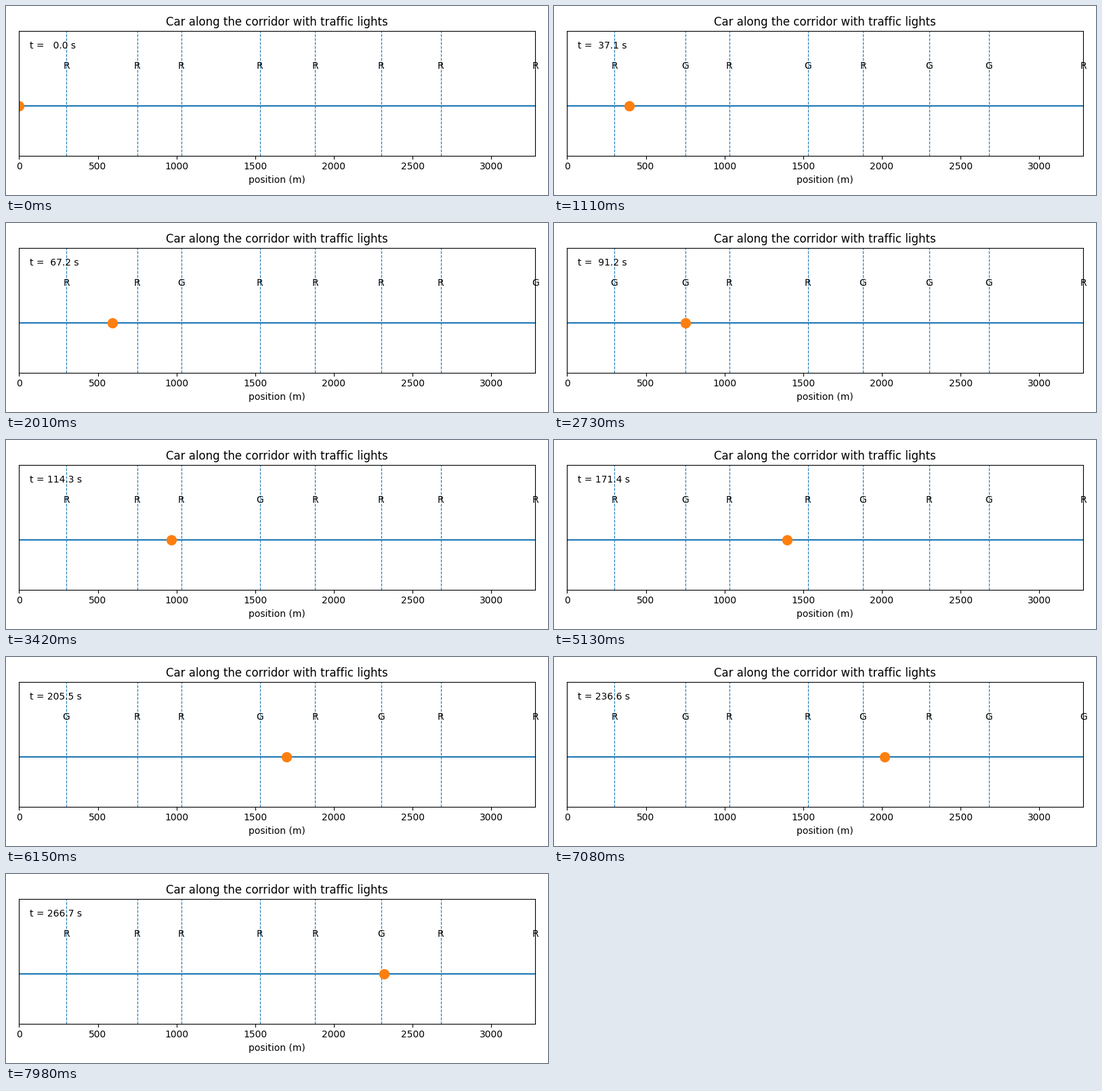
Recreate the animation shown at these times as a matplotlib script. Size 800 by 280 pixels, loop 8000 ms.

```python
import numpy as np
import matplotlib.pyplot as plt
from matplotlib.animation import FuncAnimation

LOOP_MS = 8000
FRAMES = 267
STEP = 400 / 399  # simulated seconds per frame
GREEN = 23        # green time, s
TOP_SPEED = 13.3  # m/s

stops = np.cumsum([300, 450, 280, 500, 350, 420, 380, 600])
cycles = [65, 70, 60, 80, 70, 60, 70, 90]
starts = [9, 21, 1, 29.5, 12.5, 25, 20, 45]
length = stops[-1]


def is_green(t, cycle, start):
    return (t - start) % cycle < GREEN


def passing_times():
    """Steady speed between lights, slowed to meet the next green."""
    times = [0]
    for gap, cycle, start in zip(np.diff(stops, prepend=0), cycles, starts):
        t = times[-1] + gap / TOP_SPEED
        if not is_green(t, cycle, start):
            t += (start - t) % cycle
        times.append(t)
    return times


pass_t = passing_times()
pass_x = [0, *stops]

fig, ax = plt.subplots(figsize=(8, 2.8), dpi=100)
ax.set_xlim(0, length)
ax.set_ylim(-1, 1.5)
ax.set_yticks([])
ax.set_xlabel("position (m)")
ax.set_title("Car along the corridor with traffic lights")

ax.plot([0, length], [0, 0], color="C0")
for x in stops:
    ax.axvline(x, color="C0", linestyle="--", linewidth=0.8)
labels = [ax.text(x, 0.8, "R", ha="center", va="center") for x in stops]
car, = ax.plot([0], [0], "o", color="C1", markersize=10)
clock = ax.text(0.02, 0.92, "", transform=ax.transAxes, va="top")
fig.tight_layout()
fig.subplots_adjust(right=781.25 / 800)


def update(i):
    t = i * STEP
    car.set_data([np.interp(t, pass_t, pass_x)], [0])
    clock.set_text(f"t = {t:5.1f} s")
    for label, cycle, start in zip(labels, cycles, starts):
        label.set_text("G" if is_green(t, cycle, start) else "R")
    return [car, clock, *labels]


anim = FuncAnimation(fig, update, frames=FRAMES, init_func=lambda: update(0),
                     interval=LOOP_MS / FRAMES, repeat=True, repeat_delay=0)
plt.show()
```
